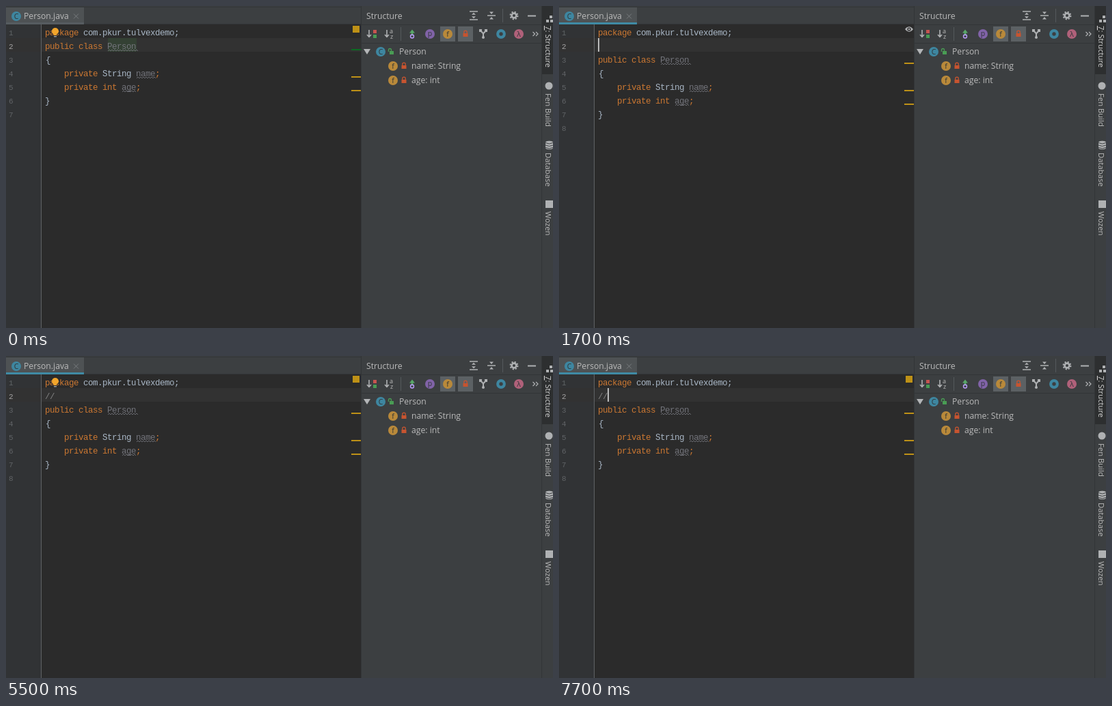
Write an HTML page that moves like this. It is 800 by 472 pixels and loops after 8000 ms.

```html
<!DOCTYPE html>
<html lang="en">
<head>
<meta charset="utf-8">
<title>Code editor</title>
<style>
html, body { margin: 0; width: 100%; height: 100%; overflow: hidden; background: #2b2b2b; }
svg { display: block; width: 800px; height: 472px; }
text { white-space: pre; }
.ui { font: 12.2px "Open Sans", "Noto Sans", sans-serif; fill: #bbb; }
.side { font-size: 11.3px; }
.code { font: 12.5px "Liberation Mono", "DejaVu Sans Mono", monospace; letter-spacing: -.5px; fill: #a9b7c6; }
.num { font-size: 11px; fill: #606366; }
.num.on { fill: #a4a3a3; }
.kw { fill: #cc7832; }
.dim { fill: #72737a; }
.note { fill: #808080; }
.wave { fill: none; stroke: #72737a; stroke-width: .9; }
.glyph { font: 10.5px "Open Sans", "Noto Sans", sans-serif; text-anchor: middle; fill: #2f3537; }
.line { fill: none; stroke: #afb1b3; stroke-width: 1.6; }
.rule { fill: none; stroke: #323537; }
</style>
</head>
<body>
<svg viewBox="0 0 800 472">
  <defs>
    <g id="lock"><path d="M-2.2-1v-1.6a2.2 2.2 0 0 1 4.4 0V-1" fill="none" stroke="#c75430" stroke-width="1.3"/><path d="M-3.5-1h7v5h-7z" fill="#c75430"/></g>
    <g id="class"><circle r="7" fill="#3e86a0"/><text class="glyph" y="3.6">C</text></g>
    <g id="field"><circle r="7" fill="#b9893a"/><text class="glyph" y="3.8">f</text></g>
  </defs>

  <!-- editor -->
  <path d="M0 27h519v445H0z" fill="#2b2b2b"/>
  <path d="M0 27h51v445H0z" fill="#313335"/>
  <rect id="row" width="519" height="20" fill="#323232"/>
  <path d="M51.5 27v445" stroke="#606366"/>
  <g id="numbers"></g>
  <rect id="usage" x="149" y="47" width="42" height="20" fill="#344134"/>
  <text class="code" x="57" y="43"><tspan class="kw">package</tspan> com.pkur.tulvexdemo;</text>
  <text class="code" id="typed" x="57" y="63"></text>
  <g id="body">
    <text class="code" x="57" y="63"><tspan class="kw">public class</tspan> <tspan class="dim">Person</tspan></text>
    <text class="code" x="58" y="83">{</text>
    <text class="code" x="85" y="103"><tspan class="kw">private</tspan> String <tspan class="dim">name</tspan><tspan class="kw">;</tspan></text>
    <text class="code" x="85" y="123"><tspan class="kw">private int</tspan> <tspan class="dim">age</tspan><tspan class="kw">;</tspan></text>
    <text class="code" x="57" y="143">}</text>
    <g id="waves"></g>
    <path id="mark" d="M505 63h14v2h-14z"/>
    <path d="M505 103h14v2h-14zM505 123h14v2h-14z" fill="#be9117"/>
  </g>
  <rect id="warn" x="507" y="29" width="10" height="10" fill="#be9117"/>
  <g id="eye"><path d="M506 34q6-7.6 12 0q-6 7.6-12 0z" fill="#afb1b3"/><circle cx="512" cy="34" r="2.6" fill="#2b2b2b"/><circle cx="512" cy="34" r="1.3" fill="#afb1b3"/></g>
  <g id="bulb"><circle cx="72" cy="37" r="5" fill="#f2a52c"/><path d="M70 41h4v2h-4z" fill="#f2a52c"/><path d="M70 44h4v1.5h-4z" fill="#9a9da0"/></g>
  <rect id="caret" width="2" height="20" fill="#bbb"/>

  <!-- tabs -->
  <path d="M0 0h519v27H0z" fill="#3c3f41"/>
  <path d="M0 2h114v25H0z" fill="#4e5254"/>
  <path d="M0 1.5h519M0 26.5h519" class="rule"/>
  <rect id="focus" y="24" width="114" height="3"/>
  <use href="#class" x="15" y="15"/>
  <text class="ui" x="26" y="19">Person.java</text>
  <path d="M99 11.5l7 7m0-7l-7 7" stroke="#777b7e"/>

  <!-- structure panel -->
  <path d="M519 0h281v472H519z" fill="#3c3f41"/>
  <path d="M519.5 0v472M520 27.5h263M520 54.5h263M783.5 0v472" class="rule"/>
  <text class="ui" x="527" y="19">Structure</text>
  <g class="line">
    <path d="M678 8h12M678 20h12M704 14h12"/>
    <path d="M726.5 4v20M577.5 31v20" stroke="#55595c" stroke-width="1"/>
    <path d="M763 14.5h12" stroke-width="2"/>
    <circle cx="743" cy="14" r="3.4" stroke-width="2.6"/>
    <circle cx="743" cy="14" r="5.4" stroke-width="2" stroke-dasharray="2.12"/>
  </g>
  <path d="M681 12.8l3-3 3 3zM681 15.2l3 3 3-3zM707 8.5h6l-3 3.6zM707 19.5h6l-3-3.6z" fill="#afb1b3"/>

  <g class="line">
    <path d="M531 35v10m-3-3l3 3.3 3-3.3M557 35v10m-3-3l3 3.3 3-3.3"/>
    <path d="M694 36l4 4.5 4-4.5M698 40v6" stroke-width="2"/>
    <path d="M770.5 38l3 3-3 3m4.500-6l3 3-3 3" stroke-width="1.2"/>
  </g>
  <path d="M537 35h5v5h-5z" fill="#c75450"/><path d="M537 42h5v5h-5z" fill="#499c54"/>
  <text class="ui" x="561" y="40" font-size="9" style="font-size:9px">a</text>
  <text class="ui" x="562" y="48" style="font-size:9px">z</text>
  <path d="M590 39.500l4-5 4 5h-2.700v4h-2.600v-4z" fill="#59a869"/>
  <circle cx="594" cy="44.500" r="2.500" fill="none" stroke="#b99bf8" stroke-width="1.4"/>
  <circle cx="620" cy="41" r="7" fill="#8163a8"/><text class="glyph" x="620" y="44">p</text>
  <path d="M635 30h22v22h-22zM661 30h22v22h-22z" fill="#5c6164"/>
  <use href="#field" x="646" y="41"/>
  <use href="#lock" x="672" y="41"/>
  <circle cx="698" cy="46" r="2" fill="#afb1b3"/><path d="M692 34h4v4h-4zM700 34h4v4h-4z" fill="#afb1b3"/>
  <circle cx="724" cy="41" r="4.800" fill="none" stroke="#3e86a0" stroke-width="4.200"/>
  <circle cx="750" cy="41" r="7" fill="#b0617a"/><text class="glyph" x="750" y="44.500">λ</text>

  <path d="M523 63h10l-5 8z" fill="#b4b6b8"/>
  <use href="#class" x="548" y="67"/>
  <path d="M559.500 67v-2.500a2 2 0 0 1 4 0V66" fill="none" stroke="#499c54" stroke-width="1.300"/><path d="M561 66h6v5h-6z" fill="#499c54"/>
  <text class="ui" x="575" y="71">Person</text>
  <use href="#field" x="566" y="88"/><use href="#lock" x="582" y="88"/>
  <text class="ui" x="593" y="92">name: String</text>
  <use href="#field" x="566" y="109"/><use href="#lock" x="582" y="109"/>
  <text class="ui" x="593" y="113">age: int</text>

  <!-- side stripe -->
  <path d="M784 0h16v100h-16z" fill="#2d2f30"/>
  <g fill="#afb1b3">
    <path d="M795 14h4v4h-4zM790 20h4v4h-4zM796 20h4v4h-4z"/>
    <circle cx="794" cy="117" r="5.500"/>
    <path d="M789 200c0-3 11-3 11 0v8c0 3-11 3-11 0z"/>
    <path d="M789 285h11v11h-11z"/>
  </g>
  <path d="M789 200.500q5.500 3 11 0m-11 3.500q5.500 3 11 0m-11 3.500q5.500 3 11 0" fill="none" stroke="#3c3f41"/>
  <g id="side"></g>
</svg>
<script>
const $ = id => document.getElementById(id);
const svg = markup => markup.join('');
const LOOP = 8000, LEFT = 57, CHAR = 7, TOP = 27, ROW = 20;

$('side').innerHTML = svg([
  [29, '<tspan text-decoration="underline">7</tspan>: Structure', '#d4d4d4'],
  [128, 'Fen Build', '#bbb'],
  [215, 'Database', '#bbb'],
  [301, 'Wozen', '#bbb']
].map(([y, label, color]) =>
  `<text class="ui side" style="fill:${color}" transform="translate(789 ${y}) rotate(90)">${label}</text>`));

$('numbers').innerHTML = svg([1, 2, 3, 4, 5, 6, 7, 8].map(n =>
  `<text class="code num" x="4" y="${TOP + n * ROW - 4}">${n}</text>`));
const numbers = [...$('numbers').children];

$('waves').innerHTML = svg([[149, 66, 42], [191, 106, 28], [170, 126, 21]].map(([x, y, w]) =>
  `<path class="wave" d="M${x} ${y}${'l2-2 2 2'.repeat(Math.round(w / 4))}"/>`));

// Each entry changes part of the state at its time.
const timeline = [
  [0, { line: 2, rows: 7, text: '', caret: 0, focus: 0, bulb: 1, eye: 0, usage: 1 }],
  [900, { line: 1, caret: 1, focus: 1, bulb: 0 }],
  [1200, { usage: 0 }],
  [1700, { line: 2, rows: 8, eye: 1 }],
  [2100, { eye: 0 }],
  [2600, { text: '/', eye: 1 }],
  [2800, { text: '//' }],
  [3000, { eye: 0 }],
  [3300, { bulb: 1 }],
  [3700, { caret: 0 }],
  [4100, { caret: 1 }],
  [4600, { caret: 0 }],
  [5000, { caret: 1 }],
  [5500, { caret: 0 }],
  [6000, { caret: 1 }],
  [6400, { text: '//I', eye: 1 }],
  [6500, { bulb: 0 }],
  [6600, { text: '//IP' }],
  [6800, { text: '//IPF' }],
  [6900, { text: '//IPFI' }],
  [7200, { text: '//IPF' }],
  [7300, { text: '//IP' }],
  [7400, { text: '//I' }],
  [7500, { text: '//' }],
  [7700, { eye: 0 }]
];

const show = (id, on) => $(id).setAttribute('visibility', on ? 'visible' : 'hidden');

function render(t) {
  const s = Object.assign({}, ...timeline.filter(([at]) => at <= t).map(([, change]) => change));
  const y = TOP + (s.line - 1) * ROW;
  const column = s.line === 1 ? 28 : s.text.length;
  $('row').setAttribute('y', y);
  $('caret').setAttribute('x', LEFT + column * CHAR);
  $('caret').setAttribute('y', y);
  $('body').setAttribute('transform', `translate(0 ${(s.rows - 7) * ROW})`);
  $('typed').textContent = s.text;
  $('typed').classList.toggle('note', s.text.length > 1);
  $('focus').setAttribute('fill', s.focus ? '#3f8ba5' : '#565c60');
  $('mark').setAttribute('fill', s.usage ? '#0b6b22' : '#be9117');
  numbers.forEach((el, i) => {
    el.classList.toggle('on', i + 1 === s.line);
    el.setAttribute('visibility', i < s.rows ? 'visible' : 'hidden');
  });
  show('caret', s.caret);
  show('bulb', s.bulb);
  show('eye', s.eye);
  show('warn', !s.eye);
  show('usage', s.usage);
}

const start = performance.now();
function tick(now) {
  render(Math.max(0, now - start) % LOOP);
  requestAnimationFrame(tick);
}
render(0);
requestAnimationFrame(tick);
</script>
</body>
</html>
```
